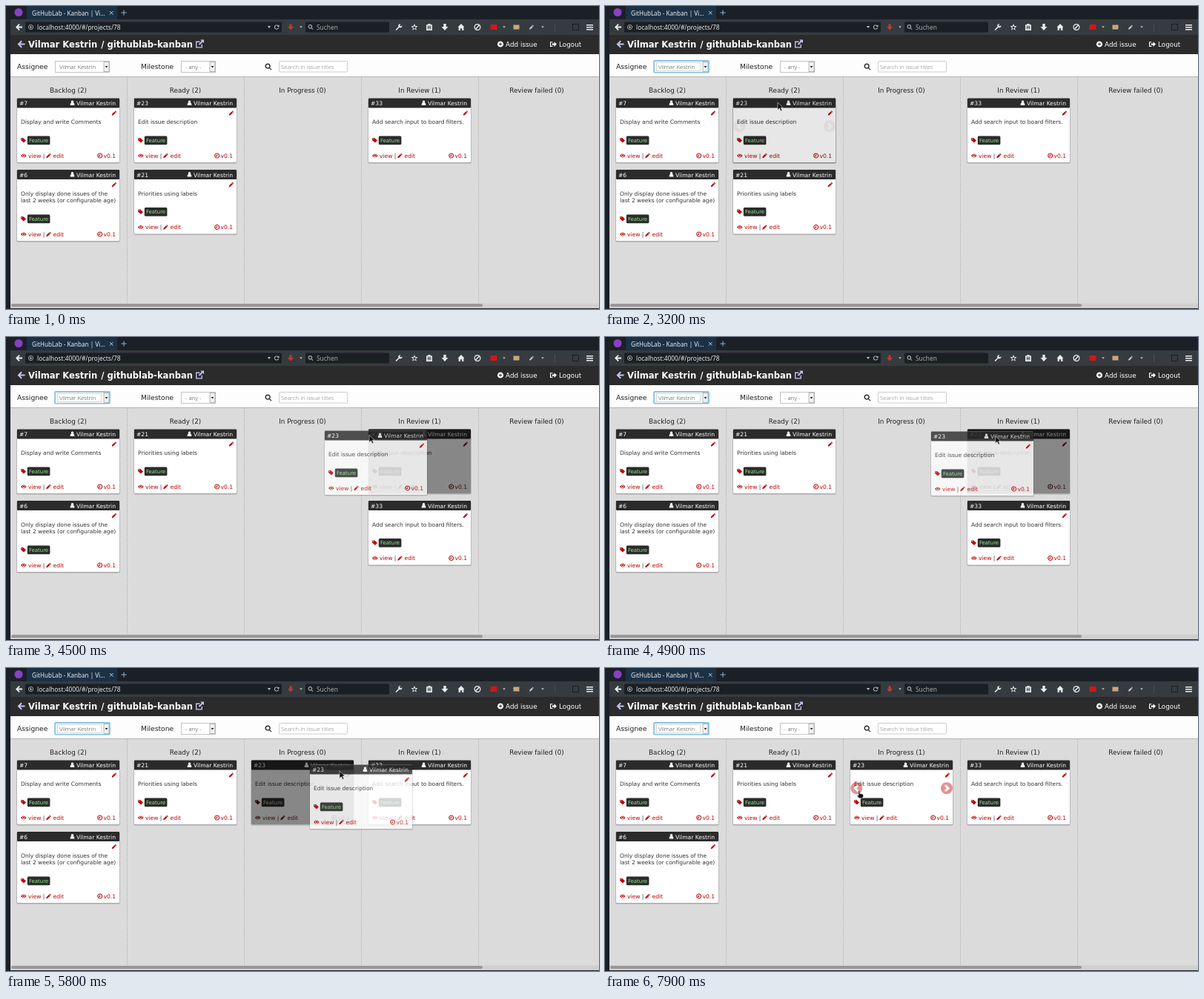
An HTML page for the animation above (8000 ms loop, 800 by 409 pixels).

```html
<!DOCTYPE html>
<html lang="en">
<head>
<meta charset="utf-8">
<title>Kanban board</title>
<style>
html, body { margin: 0; width: 100%; height: 100%; overflow: hidden; background: #14181d; }
svg { display: block; width: 100%; height: 100%; }
text { font-family: "DejaVu Sans", sans-serif; white-space: pre; }
.ui { font-family: "Noto Sans", "Open Sans", sans-serif; }
.thin { font-family: "Open Sans", "Noto Sans", sans-serif; font-weight: 300; }
.held { filter: grayscale(.6) brightness(.53); }
</style>
</head>
<body>
<svg id="stage" viewBox="0 0 800 409" preserveAspectRatio="none"></svg>
<script>
const OWNER = 'Vilmar Kestrin';
const RED = '#c00000', DARK = '#2b2b2b', LILAC = '#c3c3ee';
const LOOP = 8000, STEP = 100;
const GRAB = 3200, DROP = 6300, FOCUS = 1000;

// Icons on a 16 x 16 grid
const ICONS = {
  pencil: 'M0 16l1-5 8-8 4 4-8 8zM10 2l2-2 4 4-2 2z',
  eye: 'M0 8q8-11 16 0q-8 11-16 0zM8 4a4 4 0 1 0 .01 0zM8 5.5a2.3 2.3 0 1 0 .01 0z',
  tag: 'M0 1h7l9 8-7 7-9-8zM3 2.5a1.5 1.5 0 1 0 .01 0z',
  user: 'M8 0a4.3 4.3 0 1 0 .01 0zM1 16q0-8.5 4-8.5q3 2.5 6 0q4 0 4 8.5z',
  clock: 'M8 0a8 8 0 1 0 .01 0zM8 2.5a5.5 5.5 0 1 0 .01 0zM7 4h2v6H4.5V8H7z',
  chevron: 'M8 0a8 8 0 1 0 .01 0zM9 3l2 2-3 3 3 3-2 2-5-5z',
  plus: 'M8 0a8 8 0 1 0 .01 0zM7 4h2v3h3v2H9v3H7V9H4V7h3z',
  back: 'M0 8l8-8 2.2 2.2-4 4.2H16v3.2H6.2l4 4.2L8 16z',
  link: 'M0 3h8v2H2v9h9V9h2v7H0zM9 0h7v7l-2.5-2.5-6 6-2-2 6-6z',
  logout: 'M0 2h6v2H2v8h4v2H0zM5 6h5V2l6 6-6 6v-4H5z',
  search: 'M6.5 0a6.5 6.5 0 1 0 .01 0zM6.5 2.5a4 4 0 1 0 .01 0zM10 11.5l1.5-1.5 4.5 4.5-1.5 1.5z',
  caret: 'M2 4h12l-6 8z',
  wrench: 'M0 14L7 7q-2-6 5-7l-2 4 2 2 4-2q0 7-7 5l-7 7z',
  star: 'M8 0l2.3 5.3 5.7.5-4.4 3.8 1.4 5.700-5-3-5 3 1.4-5.700L0 5.8l5.7-.5zM8 4.500L6.800 7.200l-3 .3 2.300 2-.7 3L8 11l2.600 1.500-.7-3 2.300-2-3-.3z',
  clip: 'M1 2h4V0h6v2h4v14H1zM4 5v8h8V5zM5 6h6v2H5zM5 10h6v2H5z',
  down: 'M5 0h6v7h5l-8 9-8-9h5z',
  home: 'M8 0l8 8h-2v8h-4v-5H6v5H2V8H0z',
  block: 'M8 0a8 8 0 1 0 .01 0zM8 2a6 6 0 1 0 .01 0zM3 11l8-8 2 2-8 8z',
  globe: 'M8 0a8 8 0 1 0 .01 0zM8 2a6 6 0 1 0 .01 0zM5 5h3l3 2-1 4-3 1-2-4z',
  reload: 'M8 1q4 0 5.5 2.5L16 1v6h-6l2-2Q11 3 8 3a5 5 0 1 0 5 6h2A7 7 0 1 1 8 1z'
};

const rect = (x, y, w, h, fill, more = '') =>
  `<rect x="${x}" y="${y}" width="${w}" height="${h}" fill="${fill}" ${more}/>`;
const text = (s, x, y, size, fill, more = '') =>
  `<text x="${x}" y="${y}" font-size="${size}" fill="${fill}" ${more}>${s}</text>`;
const END = 'text-anchor="end"', MID = 'text-anchor="middle"';
const UI = 'class="ui"', THIN = 'class="thin"', BOLD = 'font-weight="bold"';
// Icon centred on x, y
const icon = (name, x, y, size, fill, flip = 1) =>
  `<path d="${ICONS[name]}" fill="${fill}" fill-rule="evenodd"
    transform="translate(${x} ${y}) scale(${flip * size / 16} ${size / 16}) translate(-8 -8)"/>`;

function browser() {
  const tools = [['wrench', 530], ['star', 551], ['clip', 571], ['down', 592], ['home', 614], ['block', 636]];
  return rect(0, 0, 800, 409, '#1a2028') +
    rect(6, 0, 794, 18, '#1b2026') + rect(28, 0, 122, 18, '#1b3146') +
    '<circle cx="17" cy="8.5" r="5.5" fill="#8a3fc4"/>' +
    text('GitHubLab - Kanban | Vi...', 35, 13, 8.1, '#eee', UI) +
    '<path d="M140 7l4.5 4.5m0-4.5l-4.5 4.5" stroke="#ccc" fill="none"/>' +
    '<path d="M155.5 9h7m-3.5-3.5v7" stroke="#8ab4dc" fill="none"/>' +
    rect(6, 18, 794, 21, '#363b40') +
    rect(26, 21.5, 346, 14, '#1a1f24', 'rx="1.5"') + rect(404, 21.5, 113, 14, '#1a1f24', 'rx="1.5"') +
    icon('back', 17.5, 28.5, 9, '#f0f0f0') + icon('globe', 33.5, 28.5, 7, '#aaa') +
    text('localhost:4000/#/projects/78', 42, 32, 8.4, '#e6e6e6', UI) +
    icon('caret', 355, 28.5, 6, '#bbb') + icon('reload', 365, 28.5, 7, '#ccc') +
    icon('down', 384, 28.5, 8, '#c5392e') + icon('caret', 398, 28.5, 5, '#bbb') +
    icon('search', 411, 28.5, 7, '#bbb') + text('Suchen', 419, 32, 8.4, '#aaa', UI) +
    tools.map(([n, x]) => icon(n, x, 28.5, 9, '#ececec')).join('') +
    rect(653.5, 25, 9, 7, '#d01818', 'rx="1"') + icon('caret', 672, 28.5, 5, '#bbb') +
    rect(684.5, 25.5, 8, 6, '#c9a77c') + icon('pencil', 709, 28.5, 6, '#ccc') + icon('caret', 724, 28.5, 5, '#bbb') +
    rect(740, 23, 1, 11, '#4a4f54') +
    rect(764.5, 24.5, 8, 8, 'none', 'stroke="#0c0e10" stroke-dasharray="2 1"') +
    [25, 28, 31].map(y => rect(783, y, 9, 1.5, '#eee')).join('');
}

const select = (x, w, label) =>
  rect(x + .5, 74.5, w, 15, '#fff', 'stroke="#c4c4c4"') +
  rect(x + w - 7, 75.5, 7, 13, '#f1f1f1', 'stroke="#999" stroke-width=".7"') +
  icon('caret', x + w - 3.5, 82.3, 5, '#222') +
  text(label, x + 6, 85, 7.9, '#333', THIN);

function page() {
  return rect(6, 39, 794, 26, DARK) +
    icon('back', 20.5, 51.5, 10, LILAC) +
    text(OWNER, 30, 55.5, 11.58, '#fff', BOLD) +
    text('/ githublab-kanban', 252, 55.5, 11.58, '#fff', `${BOLD} ${END}`) +
    icon('link', 261.5, 51, 11, LILAC) +
    icon('plus', 667, 51.5, 8, '#fff') + text('Add issue', 674, 54.7, 8.85, '#fff') +
    icon('logout', 738.5, 51.5, 9, '#fff') + text('Logout', 746, 54.7, 8.85, '#fff') +
    rect(6, 65, 794, 31, '#fdfdfd') +
    text('Assignee', 15, 85, 9.2, '#222') + select(66, 73, OWNER) +
    text('Milestone', 182, 85, 9.2, '#222') + select(236, 46, '- any -') +
    icon('search', 354, 82, 9, '#222') +
    rect(368.5, 74.5, 92, 14.5, '#fff', 'stroke="#ccc" rx="1"') +
    text('Search in issue titles', 371, 85, 7.9, '#777', THIN) +
    `<g id="focus" fill="none"><rect x="66" y="73.8" width="74" height="16" rx="1" stroke="#7cc3e4" stroke-width="1.6"/>
      <rect x="69.5" y="76.5" width="59" height="11" stroke="#888" stroke-width=".7" stroke-dasharray="1 1"/></g>` +
    rect(6, 95.3, 794, 312.7, '#dbdbdb') + rect(6, 95, 794, 1, '#b4b4b4') +
    [163.5, 321.5, 479.5, 637.5].map(x =>
      `<path d="M${x} 96V401" stroke="#bcbcbc" stroke-dasharray="2 1"/>`).join('') +
    rect(6, 401.5, 794, 6.5, '#d0d0d0') + rect(7, 402, 636, 4, '#989898', 'rx="2"') +
    ['Backlog', 'Ready', 'In Progress', 'In Review', 'Review failed'].map((s, i) =>
      text(s, colX(i) + 69, 117.3, 8.75, '#222', `id="col${i}" ${MID}`)).join('');
}

const colX = i => 15 + 158 * i;
const ROWS = [124, 220.5];

function card(id, num, lines) {
  const h = 87 + 9.5 * (lines.length - 1), foot = h - 6.3, mid = h - 9;
  return `<g id="${id}">` +
    rect(-1, .8, 140, h + 1.2, '#000', 'opacity=".09" rx="2"') +
    rect(-.5, .8, 139, h + .5, '#000', 'opacity=".14" rx="2"') +
    rect(0, .5, 138, h - .5, '#fff', 'rx="1.5"') +
    rect(0, 13.4, 138, h - 13.4, '#c8ffc8', 'class="glow" opacity="0"') +
    rect(0, .5, 138, 12.9, DARK, 'rx="1"') +
    text('#' + num, 3, 10, 7.6, '#fff') +
    icon('user', 74.5, 6.8, 6.5, '#fff') + text(OWNER, 133, 10, 7.6, '#fff', END) +
    icon('pencil', 131, 20.5, 6.5, RED) +
    lines.map((s, i) => text(s, 5, 35.2 + 9.5 * i, 7.5, '#333')).join('') +
    icon('tag', 8.5, h - 30, 7, RED) + rect(13.8, h - 35.4, 30.6, 11.6, DARK, 'rx="1.5"') +
    text('Feature', 29, h - 27.3, 6.95, '#90ee90', MID) +
    icon('eye', 8.8, mid, 7.5, RED) + text('view', 15, foot, 7.6, RED) +
    text('|', 34.8, foot, 7.6, '#333') +
    icon('pencil', 42.5, mid, 6.5, RED) + text('edit', 48.5, foot, 7.6, RED) +
    icon('clock', 111.7, mid, 7, RED) + text('v0.1', 133, foot, 7.6, RED, END) +
    '<g class="arrows" opacity="0">' + icon('chevron', 8.3, 38.3, 16, RED) +
    icon('chevron', 130, 38.3, 16, RED, -1) + '</g></g>';
}

const EDIT = ['Edit issue description'];
const stage = document.getElementById('stage');
stage.innerHTML = browser() + page() +
  card('c7', 7, ['Display and write Comments']) +
  card('c6', 6, ['Only display done issues of the', 'last 2 weeks (or configurable age)']) +
  card('c21', 21, ['Priorities using labels']) +
  card('c33', 33, ['Add search input to board filters.']) +
  card('c23', 23, EDIT) +
  `<g opacity=".8">${card('ghost', 23, EDIT)}</g>` +
  `<g id="arrow"><path d="M0-.8v10l2.400-2.200 1.700 3.700 1.700-.8-1.700-3.600h3z" fill="#111" stroke="#ddd" stroke-width=".6"/></g>
   <g id="hand"><path d="M-1-2q1-1 1.800 0v3.500l3.700.8q1.200.4 1 2l-.8 3.500H0L-3 4.500q0-1.500 2-.3z" fill="#111" stroke="#ddd" stroke-width=".6"/></g>`;

const $ = id => document.getElementById(id);
const place = (id, x, y) => $(id).setAttribute('transform', `translate(${x} ${y})`);
const show = (id, on) => $(id).style.display = on ? '' : 'none';
const label = (i, s) => { if ($('col' + i).textContent !== s) $('col' + i).textContent = s; };

// Rows are [time, values...]
const POINTER = [
  [1600, -12, 70], [1900, 90, 120], [2100, 215, 178], [2300, 205, 150], [2600, 147, 58],
  [2800, 195, 95], [3000, 233, 131], [3200, 233, 131], [3600, 539, 133], [4000, 539, 133],
  [4200, 556, 133], [4400, 490, 133], [4500, 490, 133], [4800, 500, 134], [5100, 580, 135],
  [5300, 577, 134.5], [5400, 551, 134], [5700, 470, 137], [6000, 410, 145], [6300, 392, 150],
  [6600, 386, 197], [6900, 392, 225], [7200, 396, 243], [7600, 376, 243], [7900, 343, 168]
];
const HOVER = [
  [1900, 0], [2100, .5], [2300, .5], [2500, 0], [2800, 0], [3000, .5], [3200, .5], [3500, 0],
  [6300, 0], [6500, .5], [7000, .5], [7200, 0], [7700, 0], [7900, .42]
];
const GLOW = [[6200, 0], [6300, 1], [6700, 1], [7400, 0]];

function at(rows, t) {
  const i = rows.findIndex(r => r[0] > t);
  if (i === 0) return rows[0].slice(1);
  if (i < 0) return rows[rows.length - 1].slice(1);
  const a = rows[i - 1], b = rows[i], k = (t - a[0]) / (b[0] - a[0]);
  return a.slice(1).map((v, n) => v + (b[n + 1] - v) * k);
}

function draw(t) {
  const held = t >= GRAB && t < DROP, done = t >= DROP;
  const col = t < 3400 ? 1 : t < 4000 ? 2 : t < 5800 ? 3 : 2;
  place('c23', colX(col), ROWS[0]);
  place('c21', colX(1), ROWS[col === 1 ? 1 : 0]);
  place('c33', colX(3), ROWS[col === 3 ? 1 : 0]);
  $('c23').setAttribute('class', held ? 'held' : '');
  $('c23').querySelector('.arrows').setAttribute('opacity', at(HOVER, t)[0]);
  $('c23').querySelector('.glow').setAttribute('opacity', at(GLOW, t)[0]);

  // The dragged copy trails the pointer by one step
  const [gx, gy] = at(POINTER, Math.max(GRAB, t - STEP));
  place('ghost', gx - 60, gy - 7);
  show('ghost', held);

  const [x, y] = at(POINTER, t), link = t >= 7900;
  place('arrow', x, y);
  place('hand', x, y);
  show('arrow', !link);
  show('hand', link);
  show('focus', t >= FOCUS);
  label(1, `Ready (${done ? 1 : 2})`);
  label(2, `In Progress (${done ? 1 : 0})`);
}

label(0, 'Backlog (2)');
label(3, 'In Review (1)');
label(4, 'Review failed (0)');
place('c7', colX(0), ROWS[0]);
place('c6', colX(0), ROWS[1]);

const start = performance.now();
function tick() {
  const t = (performance.now() - start) % LOOP;
  draw(Math.floor(t / STEP) * STEP);
  requestAnimationFrame(tick);
}
tick();
</script>
</body>
</html>
```
